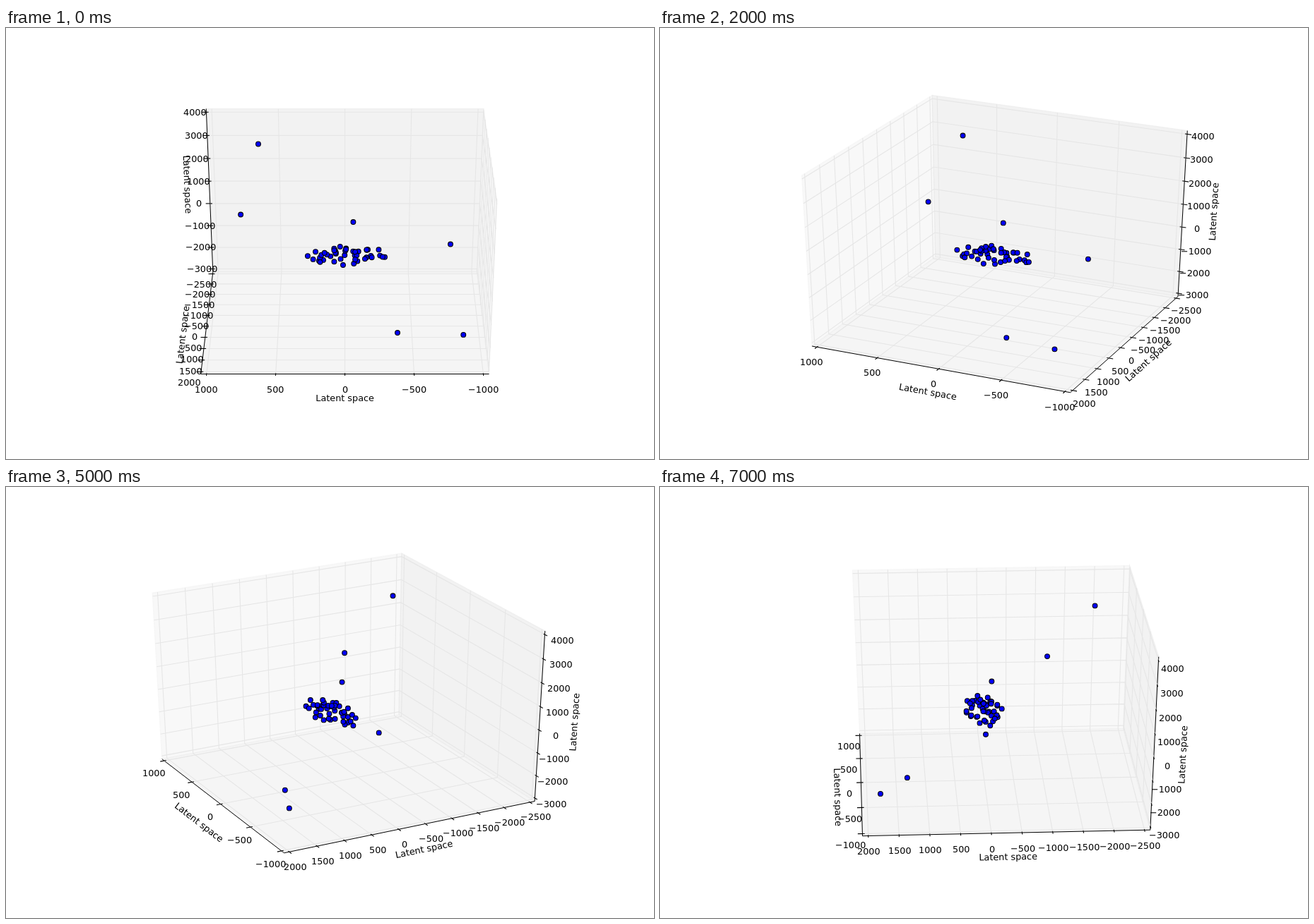
These frames come from a looping animation (917x611 px, 8000 ms). An HTML page with a canvas:

```html
<!DOCTYPE html>
<html lang="en">
<head>
<meta charset="utf-8">
<title>Rotating 3D scatter plot</title>
<style>
  html, body { margin: 0; width: 100%; height: 100%; overflow: hidden; background: #fff; }
  canvas { display: block; }
</style>
</head>
<body>
<canvas id="stage" width="917" height="611"></canvas>
<script>
const ctx = document.getElementById('stage').getContext('2d');

// Camera: the data box is a unit cube around the origin.
const STEP_MS = 1000, STEPS = 8, TURN = 2 * Math.PI / 29;
const DIST = 10, SIN_E = 0.5, COS_E = Math.sqrt(3) / 2;
const CX = 479.6, CY = 298.9, SX = 3841.6, SY = 2642;

const HALF = 0.5 + 1 / 48;      // box including its margin
const UNIT = 1 / 12;
const TICK_PAD = 0.0445, LABEL_PAD = 0.0926;
const FONT = '12.8px "DejaVu Sans", sans-serif';

// flip: direction in which the axis line leaves the far corner
const AXES = [
  { min: -1000, max: 1000, step: 500, flip: 1, tickDir: 1, pane: 'rgba(242,242,242,.5)' },
  { min: -2500, max: 2000, step: 500, flip: 0, tickDir: 0, pane: 'rgba(230,230,230,.5)' },
  { min: -3000, max: 4000, step: 1000, flip: 0, tickDir: 0, pane: 'rgba(236,236,236,.5)' },
];

// Data value to box coordinate
const scale = (value, { min, max }) => (value - min) / (max - min) - 0.5;

const OUTLIERS = [
  [647, -1941, 3150], [780, -1174, 739], [-61, -124, 1337],
  [-773, 55, 543], [-383, 1319, -2118], [-853, 1775, -1746],
];

// The main cluster: a ball around zero, filled evenly by a low-discrepancy sequence.
const CLUSTER_SIZE = 44, CLUSTER_RADIUS = 325, PLASTIC = 1.22074408;

function clusterPoint(i) {
  const spread = power => (0.5 + i / PLASTIC ** power) % 1;
  const radius = CLUSTER_RADIUS * Math.cbrt(spread(1));
  const height = 2 * spread(2) - 1, ring = Math.sqrt(1 - height * height);
  const angle = 2 * Math.PI * spread(3);
  return [ring * Math.cos(angle), ring * Math.sin(angle), height].map(c => c * radius);
}

const cluster = Array.from({ length: CLUSTER_SIZE }, (_, i) => clusterPoint(i));
const POINTS = [...OUTLIERS, ...cluster].map(p => p.map((value, i) => scale(value, AXES[i])));

let sinA = 1, cosA = 0;

function project([x, y, z]) {
  const right = -sinA * x + cosA * y;
  const toward = cosA * x + sinA * y;
  const depth = DIST - toward * COS_E - z * SIN_E;
  return [CX + SX * right / depth, CY - SY * (z * COS_E - toward * SIN_E) / depth];
}

function withValue(p, i, value) {
  const q = p.slice();
  q[i] = value;
  return q;
}
const mirrored = (p, i) => withValue(p, i, -p[i]);

// Move a point away from the centre in every direction except along its axis.
const pushOut = (p, axis, pad) =>
  p.map((c, i) => i === axis ? c : c + (c < 0 ? -pad : pad));

function trace(points) {
  ctx.beginPath();
  points.forEach(p => ctx.lineTo(...project(p)));
}

function strokePath(points, color, width) {
  trace(points);
  ctx.strokeStyle = color;
  ctx.lineWidth = width;
  ctx.stroke();
}

function drawPane(axis, corner) {
  const a = (axis + 1) % 3, b = (axis + 2) % 3;
  const side = mirrored(corner, a);
  trace([corner, side, mirrored(side, b), mirrored(corner, b)]);
  ctx.closePath();
  ctx.fillStyle = ctx.strokeStyle = AXES[axis].pane;
  ctx.lineWidth = 1.1;
  ctx.fill();
  ctx.stroke();
}

function drawLabel(start, end, axis) {
  const [x1, y1] = project(start), [x2, y2] = project(end);
  let angle = Math.atan2(y2 - y1, x2 - x1);
  if (angle > Math.PI / 2) angle -= Math.PI;
  if (angle < -Math.PI / 2) angle += Math.PI;
  const middle = start.map((c, i) => (c + end[i]) / 2);
  ctx.save();
  ctx.translate(...project(pushOut(middle, axis, LABEL_PAD)));
  ctx.rotate(angle);
  ctx.textAlign = 'center';
  ctx.fillText('Latent space', 0, 3.5);
  ctx.restore();
}

// Tick labels sit on whole pixels.
function drawTickLabel(value, [x, y]) {
  const text = String(value).replace('-', '\u2212');
  const left = x - ctx.measureText(text).width / 2;
  ctx.fillText(text, Math.round(left), Math.round(y + 10));
}

function drawAxis(axis, corner) {
  const { min, max, step, flip, tickDir } = AXES[axis];
  const start = mirrored(corner, flip), end = mirrored(start, axis);
  strokePath([start, end], '#000', 1);

  const values = [];
  for (let value = min; value <= max; value += step) values.push(value);
  for (const value of values) {
    const p = withValue(corner, axis, scale(value, AXES[axis]));
    strokePath([mirrored(p, (axis + 1) % 3), p, mirrored(p, (axis + 2) % 3)], '#e6e6e6', 1.1);
  }

  ctx.fillStyle = '#000';
  drawLabel(start, end, axis);

  const sign = Math.sign(corner[tickDir]) * UNIT;
  for (const value of values) {
    const p = withValue(start, axis, scale(value, AXES[axis])), base = p[tickDir];
    strokePath([
      withValue(p, tickDir, base + 0.1 * sign),
      withValue(p, tickDir, base - 0.2 * sign),
    ], '#000', 1.1);
    drawTickLabel(value, project(pushOut(p, axis, TICK_PAD)));
  }
}

function drawPoint(point) {
  ctx.beginPath();
  ctx.arc(...project(point), 3.4, 0, 2 * Math.PI);
  ctx.fillStyle = '#00f';
  ctx.strokeStyle = '#000';
  ctx.lineWidth = 1.1;
  ctx.fill();
  ctx.stroke();
}

function draw(step) {
  const azimuth = Math.PI / 2 + step * TURN;
  sinA = Math.sin(azimuth);
  cosA = Math.cos(azimuth);
  // The corner of the box farthest from the viewer, where the panes meet.
  const corner = [cosA < -1e-9 ? HALF : -HALF, -HALF, -HALF];

  ctx.fillStyle = '#fff';
  ctx.fillRect(0, 0, 917, 611);
  ctx.font = FONT;
  for (let axis = 0; axis < 3; axis++) drawPane(axis, corner);
  for (let axis = 0; axis < 3; axis++) drawAxis(axis, corner);
  POINTS.forEach(drawPoint);
}

function tick() {
  draw(Math.floor(performance.now() / STEP_MS) % STEPS);
  requestAnimationFrame(tick);
}
tick();
</script>
</body>
</html>
```
